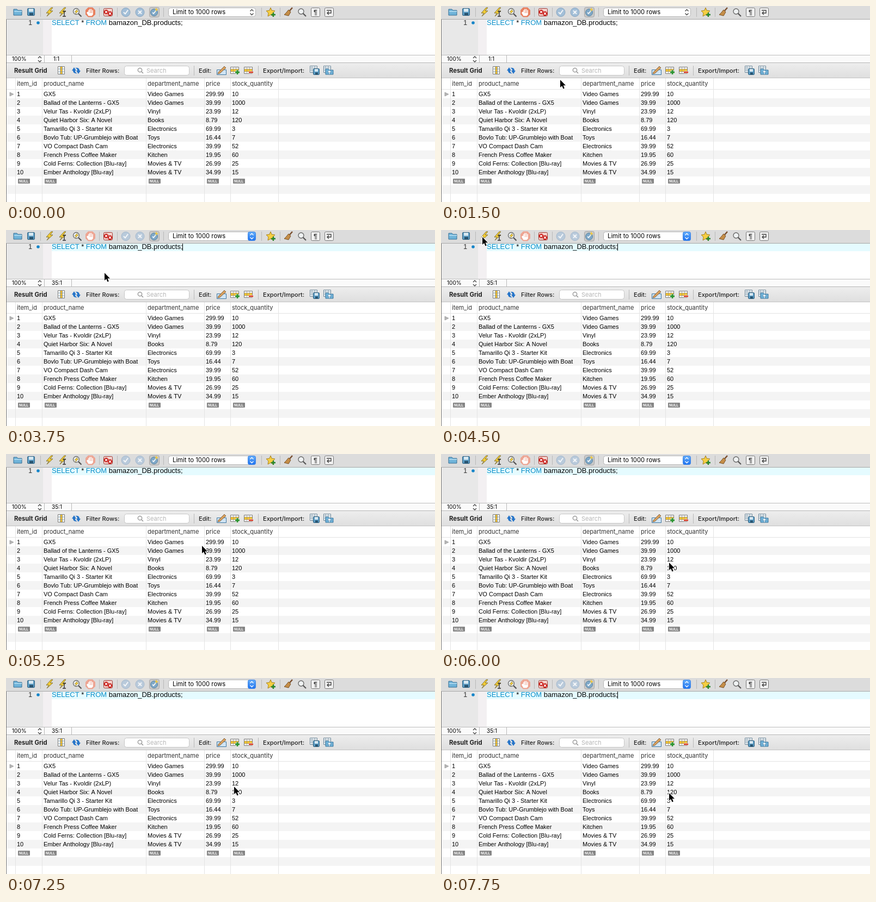
An HTML page with a canvas that plays this animation: 788 by 361 pixels, repeating every 8000 ms.

```html
<!DOCTYPE html>
<html lang="en">
<head>
<meta charset="utf-8">
<title>Query result grid</title>
<style>
html, body { margin: 0; width: 100%; height: 100%; overflow: hidden; background: #fff; }
canvas { display: block; }
</style>
</head>
<body>
<canvas id="stage" width="788" height="361"></canvas>
<script>
const g = document.getElementById('stage').getContext('2d');
const LOOP = 8000;
const UI = 'Inter, sans-serif', SANS = '"Liberation Sans", Arial, sans-serif';

// time, x, y of the pointer tip
const pointer = [
  [1000, 173, 139], [1500, 219, 136], [1750, 317, 135], [2000, 174, 67],
  [2250, 178, 78], [2500, 181, 79], [4000, 121, 63], [4250, 74, 32],
  [4500, 76, 13], [4750, 77, 7], [5000, 111, 37], [5250, 360, 169],
  [5500, 420, 204], [5750, 424, 206], [6000, 419, 200], [6250, 418, 195],
  [6500, 420, 196], [6750, 420, 205], [7000, 420, 203], [7250, 419, 200],
  [7500, 419, 212]
];
const caretOn = [[3750, 4000], [4500, 5000], [5500, 6000], [6750, 7000], [7750, 8000]];

const columns = [
  ['item_id', 20], ['product_name', 69], ['department_name', 260],
  ['price', 367], ['stock_quantity', 415]
];
const rows = [
  ['GX5', 'Video Games', '299.99', '10'],
  ['Ballad of the Lanterns - GX5', 'Video Games', '39.99', '1000'],
  ['Velur Tas - Kvoldir (2xLP)', 'Vinyl', '23.99', '12'],
  ['Quiet Harbor Six: A Novel', 'Books', '8.79', '120'],
  ['Tamarillo Qi 3 - Starter Kit', 'Electronics', '69.99', '3'],
  ['Bovlo Tub: UP-Grumblejo with Boat', 'Toys', '16.44', '7'],
  ['VO Compact Dash Cam', 'Electronics', '39.99', '52'],
  ['French Press Coffee Maker', 'Kitchen', '19.95', '60'],
  ['Cold Ferns: Collection [Blu-ray]', 'Movies & TV', '26.99', '25'],
  ['Ember Anthology [Blu-ray]', 'Movies & TV', '34.99', '15']
];

function rect(x, y, w, h, fill) {
  g.fillStyle = fill;
  g.fillRect(x, y, w, h);
}
function box(x, y, w, h, r, fill, stroke) {
  g.beginPath();
  g.roundRect(x + .5, y + .5, w - 1, h - 1, r);
  paint(fill, stroke);
}
function paint(fill, stroke, width = 1) {
  g.lineWidth = width;
  if (fill) { g.fillStyle = fill; g.fill(); }
  if (stroke) { g.strokeStyle = stroke; g.stroke(); }
}
function path(d, x, y, fill, stroke, width) {
  g.save();
  g.translate(x, y);
  const p = new Path2D(d);
  g.lineWidth = width || 1;
  if (fill) { g.fillStyle = fill; g.fill(p); }
  if (stroke) { g.strokeStyle = stroke; g.stroke(p); }
  g.restore();
}
function disc(x, y, r, fill, stroke, width) {
  g.beginPath();
  g.arc(x, y, r, 0, 7);
  paint(fill, stroke, width);
}
function text(s, x, y, font, fill = '#000') {
  g.font = font;
  g.fillStyle = fill;
  g.fillText(s, x, y);
  return x + g.measureText(s).width;
}
function chevrons(x, y, color) {
  path('M-3 -2L0 -5L3 -2M-3 2L0 5L3 2', x, y, null, color, 1.3);
}
function bolt(x, y) {
  path('M3 -8L-6 2L-1 2L-5 8L6 -2L1 -2L6 -8Z', x, y, '#f7cf35', '#81702d', 1);
}
function lens(x, y, r, fill) {
  path(`M${r * .7} ${r * .7}L${r + 4} ${r + 4}`, x, y, null, '#555', 2.2);
  disc(x, y, r, fill, '#666', 1.3);
}
function floppy(x, y, w) {
  box(x, y, w, w, 1.5, '#5b9cc4', '#2f607f');
  rect(x + 3, y + 1, w - 6, w * .4, '#d9e9f2');
  rect(x + 4, y + w * .62, w - 7, w * .3, '#28536f');
}
function divider(x, y, h) {
  rect(x, y, 1, h, '#b9b9b9');
}

function drawToolbar(active) {
  rect(0, 0, 788, 24, '#dcdcdc');
  rect(0, 24, 788, 1, '#a8a8a8');
  path('M0 2L6 2L8 4L15 4L15 13L0 13Z', 14, 4, '#6fb3d9', '#366f94');
  path('M1 6H15', 14, 4, null, '#a8d5ec', 2);
  floppy(39, 4, 14);
  for (const x of [63, 171, 204, 289, 469, 503]) divider(x, 3, 17);

  bolt(80, 11);
  bolt(104, 11);
  path('M-3 -4H3M0 -4V5M-3 5H3', 107, 14, null, '#333', 1.4);
  lens(129, 10, 5.5, '#e9eef0');
  path('M2 -4L-3 1L0 1L-2 5L4 -1L1 -1Z', 129, 10, '#f7cf35', '#98802c', .6);

  // stop sign with a raised hand
  path('M-4 -9H4L9 -4V4L4 9H-4L-9 4V-4Z', 155, 11.5, active ? '#eda593' : '#e8805f');
  path('M-3 6L-6 1L-5 0L-3 2V-4M-1 1V-6M1.5 1V-6M4 2V-4M-3 2H4V4L2 6H-3Z',
    155, 11.5, '#fff', '#fff', 1.6);

  box(179, 4, 17, 15, 2, '#f3d3ce', '#a33a32');
  disc(184, 11, 4.3, '#c91f1a');
  disc(191, 14, 4.3, '#c91f1a');
  path('M-2 -2L2 2M2 -2L-2 2', 184, 11, null, '#fff', 1.3);
  path('M-2 -2L2 2M2 -2L-2 2', 191, 14, null, '#fff', 1.3);

  const round = active ? '#b9cadb' : '#a3bfd8';
  const rim = active ? '#a5b9cd' : '#88a5c0';
  disc(220, 11.5, 8, round, rim);
  path('M-4 0L-1 3L4 -4', 220, 11.5, null, '#f5f7f9', 2);
  disc(246, 11.5, 8, round, rim);
  path('M-3 -3L3 3M3 -3L-3 3', 246, 11.5, null, '#f5f7f9', 2);
  box(263, 2, 19, 19, 3, '#c9c9c9', '#a5a5a5');
  disc(272, 12, 6.5, '#7fa8c8', '#58829e');
  path('M-3 0L-1 2L4 -4', 272, 12, null, '#fff', 1.7);
  path('M4 -8L0 -4L3 -4L1 0L7 -5L4 -5Z', 273, 11, '#f3c83a');

  box(298, 3, 161, 17, 4, '#fff', '#b5b5b5');
  text('Limit to 1000 rows', 306, 15, '11.3px ' + UI);
  if (active) {
    const blue = g.createLinearGradient(0, 3, 0, 20);
    blue.addColorStop(0, '#69b1fa');
    blue.addColorStop(1, '#1b70ef');
    box(444, 3, 15, 17, 3, blue, '#3a82e6');
  }
  chevrons(451.5, 11.5, active ? '#fff' : '#444');

  path('M0 -8L2 -3L8 -2L4 2L5 8L0 5L-5 8L-4 2L-8 -2L-2 -3Z', 486, 11, '#f5ce42', '#a78223');
  path('M-4 0H4M0 -4V4', 491, 16, null, '#25852d', 2.4);
  path('M7 -8L1 -1', 519, 11, null, '#7b5030', 2.5);
  path('M0 -4L4 0L0 7L-8 5L-4 1Z', 519, 11, '#c58e48', '#795329');
  lens(542, 10, 5, '#eef1f2');
  box(560, 3, 17, 17, 2, '#f0f0f0', '#777');
  text('¶', 565, 16, 'bold 12px ' + SANS, '#444');
  box(585, 3, 17, 17, 2, '#f0f0f0', '#777');
  path('M-4 -3H4V2H-3M0 -1L-3 2L0 5', 593, 11, null, '#444', 1.4);
}

function drawEditor(active, caret) {
  rect(84, 25, 704, 66, '#fff');
  rect(0, 25, 68, 66, '#e8e8e8');
  rect(68, 25, 16, 66, '#f3f0f2');
  if (active) rect(84, 25, 704, 14, '#e5fbff');
  text('1', 41, 35, '13px ' + SANS, '#333');
  disc(59, 31, 2.8, '#1685c9');
  const font = '13px ' + SANS, key = '#0b8fc9';
  let x = text('SELECT', 84, 35, font, key);
  x = text(' * ', x, 35, font);
  x = text('FROM', x, 35, font, key);
  text(' bamazon_DB.products;', x, 35, font);
  if (caret) rect(324, 25, 1, 13, '#000');

  rect(0, 90, 788, 14, '#fafafa');
  rect(0, 90, 788, 1, '#bcbcbc');
  divider(70, 91, 13);
  divider(120, 91, 13);
  text('100%', 11, 101, '10px ' + UI);
  chevrons(62, 98, '#444');
  text(active ? '35:1' : '1:1', active ? 84 : 87, 101, '10px ' + UI);
}

function gridIcon(x, sign, color) {
  box(x, 112, 16, 13, 0, '#fff', '#777');
  rect(x + 1, 116, 14, 5, '#f4c430');
  path('M5.5 0V13M10.5 0V13M0 4H16M0 9H16', x, 112, null, '#8d8d8d', .7);
  path(sign, x + 13, 122, null, '#fff', 4.4);
  path(sign, x + 13, 122, null, color, 2.8);
}

function drawResultBar() {
  const shade = g.createLinearGradient(0, 105, 0, 132);
  shade.addColorStop(0, '#ededed');
  shade.addColorStop(1, '#dfdfdf');
  rect(0, 104, 788, 29, shade);
  rect(0, 104, 788, 1, '#b6b6b6');
  rect(0, 132, 788, 1, '#c3c3c3');
  text('Result Grid', 15, 123, 'bold 11.3px ' + UI, '#222');
  const label = '500 11px ' + UI;
  text('Filter Rows:', 147, 123, label, '#222');
  text('Edit:', 354, 123, label, '#222');
  text('Export/Import:', 472, 123, label, '#222');
  divider(345, 110, 18);
  divider(463, 110, 18);

  box(95, 111, 13, 15, 0, '#fff', '#777');
  rect(100, 112, 4, 13, '#f2bd2e');
  path('M4.5 0V15M8.5 0V15M0 5H13M0 10H13', 95, 111, null, '#7890a0', .8);
  path('M-8 0L-4 -6L0 0H-2Q-2 4 2 5Q-6 6 -6 0ZM8 0L4 6L0 0H2Q2 -4 -2 -5Q6 -6 6 0Z', 129, 119, '#2675c9');

  box(217, 110, 120, 18, 4, '#fff', '#c7c7c7');
  disc(246, 118, 3.7, null, '#888', 1.2);
  path('M3 3L6 6', 246, 118, null, '#888', 1.3);
  text('Search', 258, 123, '11px ' + UI, '#b5b5b5');

  box(387, 117, 18, 10, 0, '#cfe4f4', '#3f76a0');
  path('M0 0L11 -11L14 -8L3 2L-1 3Z', 390, 122, '#d9a05d', '#6c5133', .8);
  gridIcon(412, 'M-4 0H4M0 -4V4', '#29912e');
  gridIcon(437, 'M-4 0H4', '#d23a25');

  for (const x of [558, 583]) {
    box(x, 110, 14, 13, 0, '#eff5f8', '#71899a');
    path('M4 0V13M9 0V13M0 4H14M0 8H14', x, 110, null, '#71899a', .7);
  }
  floppy(564, 115, 12);
  path('M0 3H5L7 5H14V13H0Z', 587, 113, '#71b2d8', '#39759b');
  path('M0 -4L4 0H1V4H-1V0H-4Z', 594, 122, '#fff', '#39759b', .6);
}

function drawGrid() {
  rect(0, 133, 788, 228, '#fff');
  for (let y = 170; y < 361; y += 32) rect(0, y, 788, 16, '#f4f4f4');
  rect(0, 153, 788, 1, '#e3e3e3');
  for (const x of [17, 66, 257, 364, 412, 500]) rect(x, 133, 1, 228, '#e4e4e4');
  for (const [name, x] of columns) {
    text(name, x, 147, '11px ' + UI, '#333');
    box(x + 2, 318, 22, 9, 0, '#858585', '#858585');
    text('NULL', x + 4, 325, 'bold 6.5px ' + SANS, '#fff');
  }
  rows.forEach((row, i) =>
    [i + 1, ...row].forEach((cell, c) =>
      text(cell, columns[c][1], 166 + i * 16, '11px ' + SANS)));
  path('M0 0L7 3.5L0 7Z', 7, 159, '#b5b5b5', '#929292', .7);
}

function drawPointer(t) {
  const at = pointer.findLast(p => p[0] <= t);
  if (!at) return;
  const arrow = 'M0 0V14L3.2 11L5.5 16.5L7.8 15.5L5.6 10.2H10Z';
  path(arrow, at[1], at[2], null, '#fff', 2);
  path(arrow, at[1], at[2], '#000');
}

function frame(now) {
  const t = now % LOOP;
  const active = t >= 3750;
  drawToolbar(active);
  drawEditor(active, caretOn.some(([a, b]) => t >= a && t < b));
  drawResultBar();
  drawGrid();
  rect(0, 25, 1, 336, '#777');
  drawPointer(t);
  requestAnimationFrame(frame);
}
frame(0);
</script>
</body>
</html>
```
